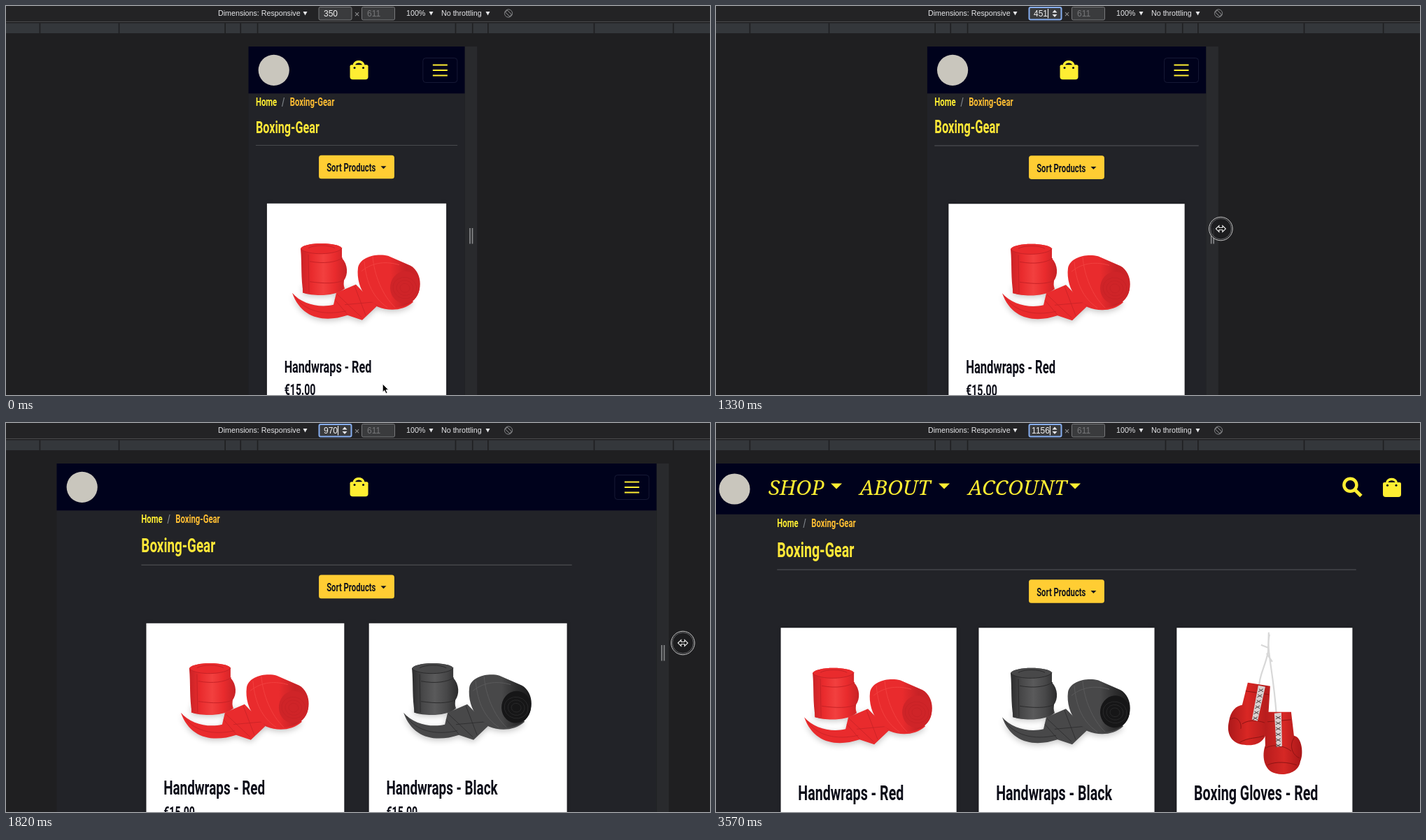
An HTML page with a canvas for the animation above (3780 ms loop, 1006 by 557 pixels).

```html
<!DOCTYPE html>
<html lang="en">
<head>
<meta charset="utf-8">
<title>Responsive shop preview</title>
<style>
html, body { margin: 0; width: 100%; height: 100%; overflow: hidden; background: #1f1f21; }
canvas { display: block; }
</style>
</head>
<body>
<canvas id="stage" width="1006" height="557"></canvas>
<script>
const ctx = document.getElementById('stage').getContext('2d');
const LOOP = 3780, STEP = 70, ZOOM = 0.884, MID = 501, TOP = 58;
const YELLOW = '#ffee32', DARK = '#1f1f21', PAGE = '#222328', NAVY = '#00021c';
const UI = '"Liberation Sans", Arial, sans-serif';

// time, device width, pointer distance from the device's right edge, pointer y
const KEYS = [
  [0, 350, -116, 547], [140, 350, 8, 329], [350, 439, 9, 322], [560, 310, 24, 320],
  [840, 270, 24, 320], [1120, 310, 30, 319], [1190, 356, 20.5, 319], [1470, 546, 21.5, 319],
  [1680, 771, 34, 317], [1820, 970, 37.5, 315], [1890, 1050, 44, 318], [2030, 1156, 50, 330]
];

const PRODUCTS = [
  ['Handwraps - Red', () => wraps('#e92b2d', '#c72226', '#f2403f', '#cf2428')],
  ['Handwraps - Black', () => wraps('#484849', '#2b2b2c', '#5a5a5b', '#161617')],
  ['Boxing Gloves - Red', gloves]
];

function pose(t) {
  const i = KEYS.findIndex(k => k[0] > t);
  if (i < 0) return KEYS[KEYS.length - 1];
  const a = KEYS[i - 1], b = KEYS[i], u = (t - a[0]) / (b[0] - a[0]);
  return a.map((v, j) => v + (b[j] - v) * u);
}

function rect(x, y, w, h, fill, r = 0, line, lw = 1) {
  ctx.beginPath();
  ctx.roundRect(x, y, w, h, r);
  if (fill) { ctx.fillStyle = fill; ctx.fill(); }
  if (line) { ctx.strokeStyle = line; ctx.lineWidth = lw; ctx.stroke(); }
}

function circle(x, y, r, fill, line, lw = 1) {
  ctx.beginPath();
  ctx.arc(x, y, r, 0, 7);
  if (fill) { ctx.fillStyle = fill; ctx.fill(); }
  if (line) { ctx.strokeStyle = line; ctx.lineWidth = lw; ctx.stroke(); }
}

function shape(d, fill, line, lw = 1) {
  const p = new Path2D(d);
  if (fill) { ctx.fillStyle = fill; ctx.fill(p); }
  if (line) { ctx.strokeStyle = line; ctx.lineWidth = lw; ctx.stroke(p); }
}

// Left-to-right gradient through evenly spaced colours
function across(x0, x1, ...colors) {
  const g = ctx.createLinearGradient(x0, 0, x1, 0);
  colors.forEach((c, i) => g.addColorStop(i / (colors.length - 1), c));
  return g;
}

function caret(x, y, w, color) {
  shape(`M${x - w / 2} ${y - w / 4}h${w}l${-w / 2} ${w / 2}z`, color);
}

function text(s, x, y, font, color, align = 'left') {
  ctx.font = font;
  ctx.fillStyle = color;
  ctx.textAlign = align;
  ctx.fillText(s, x, y);
}

// Narrow display face; y is the middle of the capitals
function narrow(s, x, y, size, color) {
  const em = size * 1.213;
  ctx.save();
  ctx.translate(x, y + em * 0.355);
  ctx.scale(0.66, 1);
  text(s, 0, 0, `600 ${em}px Roboto, sans-serif`, color);
  ctx.restore();
}

// Draws in stage pixels around a point of the page
function at(x, y, draw) {
  ctx.save();
  ctx.translate(x, y);
  ctx.scale(1 / ZOOM, 1 / ZOOM);
  draw();
  ctx.restore();
}

function wraps(base, deep, light, core) {
  ctx.save();
  ctx.translate(-501, -283);
  // soft shadows on the ground
  ctx.shadowColor = 'rgba(0,0,0,.22)';
  ctx.shadowBlur = 9;
  ctx.shadowOffsetY = 3;
  shape('M424 411C444 415 470 415 484 405L482 398H424Z', base);
  shape('M515 420C530 436 562 442 582 424L560 400Z', base);
  shape('M409 411C422 427 448 433 468 428L472 411L500 399L530 430L509 450L488 443C455 454 422 448 409 411Z', base);
  ctx.shadowColor = 'transparent';
  shape('M413 416C426 437 454 444 486 437M473 413L508 446M498 401L514 443M484 428L528 424M488 442L470 421', null, deep, 0.8);

  shape('M421 348C425 338 474 338 480 347L480 361C489 371 489 385 483 393L482 406C470 416 440 416 425 411C421 390 423 370 421 348Z',
    across(420, 487, deep, base, light, base, deep));
  shape('M421 348C425 338 474 338 480 347C474 357 430 358 421 348Z', base);
  shape('M421 348C430 358 474 357 480 347M432 347C440 342 462 342 470 347M432 356L433 411M434 366C455 370 472 367 481 361M434 395C455 398 472 398 483 393', null, deep, 1);

  shape('M503 375C506 359 530 354 546 358L578 372C596 382 597 414 577 426C560 437 530 434 515 417C506 407 501 390 503 375Z',
    across(503, 595, base, base, base, deep, core));
  shape('M512 366C515 398 525 418 545 432M524 359C526 385 538 415 556 432M508 380C525 366 545 366 562 371', null, light, 1);
  ctx.beginPath();
  ctx.ellipse(570, 403, 21, 23, 0.15, 0, 7);
  ctx.fillStyle = core;
  ctx.fill();
  for (let r = 17; r > 3; r -= 5) {
    ctx.beginPath();
    ctx.ellipse(570, 404, r, r * 0.9, 0.2, 0, 7);
    ctx.strokeStyle = deep;
    ctx.lineWidth = 0.9;
    ctx.stroke();
  }
  ctx.restore();
}

function gloves() {
  ctx.save();
  ctx.translate(-784, -293.5);
  shape('M790 300L789 328C785 350 776 360 776 380M791 303C786 325 796 350 801 418M789 322L779 318M787 330L795 342', null, '#d8d8d8', 2.2);
  const skin = across(733, 838, '#ad191b', '#d92724', '#b81d1d', '#d62825', '#a81618');
  shape('M760 372L792 377L789 425C790 455 775 464 755 461C737 460 729 445 733 428C735 412 744 405 752 404Z', skin);
  shape('M735 425C743 418 752 428 750 438M752 431C762 424 778 426 788 431M757 384L790 389M748 458C760 450 774 452 783 448', null, '#8d1413', 1);
  shape('M775 376L785 378L774 427L766 425Z', '#d9d0d0');
  shape('M784 414L822 414L826 448C838 450 840 475 835 485C833 500 815 506 800 502C782 498 780 475 785 462Z', skin);
  shape('M785 466C798 458 815 464 822 470M827 450C818 462 824 476 834 480M788 428L822 425M788 490C800 484 818 486 830 490', null, '#8d1413', 1);
  shape('M798 416L808 415L809 463L801 464Z', '#d9d0d0');
  for (let i = 0; i < 6; i++) {
    const y = i * 8;
    shape(`M${776 - i * 1.6} ${381 + y}l6 4m0 -4l-7 4M800 ${420 + y}l7 4m0 -4l-7 4`, null, '#4a3a39', 1);
  }
  ctx.restore();
}

function bag() {
  shape('M-7 -5V-8A7 6 0 0 1 6 -8V-5', null, YELLOW, 3.4);
  rect(-13, -7.3, 26, 21, YELLOW, [2, 2, 4, 4]);
  circle(-6.5, -3, 1.5, NAVY);
  circle(6, -3, 1.5, NAVY);
}

function nav(W, wide, h) {
  rect(0, 0, W, h, NAVY);
  circle(41.2, wide ? 41.3 : 38.3, 25, '#c9c6bd');
  if (!wide) {
    at(W / 2 + 4, 38, bag);
    at(W - 40, 38.5, () => {
      rect(-24.5, -17.5, 49, 35, null, 4, '#171a36');
      for (const y of [-7.5, 0, 7.5]) rect(-10.5, y - 1, 21, 2, YELLOW);
    });
    return;
  }
  const items = [['SHOP', 85, 182], ['ABOUT', 215, 336], ['ACCOUNT', 370, 523]];
  at(0, 0, () => {
    for (const [label, x, end] of items) {
      text(label, x, 45, 'italic 500 29.5px "Noto Serif", serif', YELLOW);
      caret(end, 32.5, 16, YELLOW);
    }
  });
  at(W - 116, 38, () => {
    circle(-3, -2.8, 9, null, YELLOW, 4.5);
    shape('M4 4.5L12.5 13', null, YELLOW, 5);
  });
  at(W - 52, 38.8, bag);
}

function page(W) {
  const wide = W >= 992, navH = wide ? 82.2 : 76, shift = navH - 76;
  const box = wide ? 960 : W >= 768 ? 720 : W >= 576 ? 540 : W;
  const cols = wide ? 3 : W >= 768 ? 2 : 1;
  const left = (W - box) / 2, head = 20.8 + 0.006 * W;
  const rule = 132.4 + shift + head * 1.2;

  ctx.save();
  ctx.translate(MID - W * ZOOM / 2, TOP);
  ctx.scale(ZOOM, ZOOM);
  ctx.beginPath();
  ctx.rect(0, 0, W, 600);
  ctx.clip();
  rect(0, 0, W, 600, PAGE);
  nav(W, wide, navH);

  const x = left + 12, crumb = 89.4 + shift;
  narrow('Home', x, crumb, 16, YELLOW);
  narrow('/', x + 42, crumb, 16, '#7d8287');
  narrow('Boxing-Gear', x + 55.3, crumb, 16, '#ffbe33');
  narrow('Boxing-Gear', x, 116.5 + shift + head * 0.6, head, '#ffe838');
  rect(x, rule - 0.5, box - 24, 1.1, '#55575a');

  rect(W / 2 - 61, rule + 16.2, 122, 38, '#ffcd33', 4);
  narrow('Sort Products', W / 2 - 48.5, rule + 36, 16, '#15161c');
  caret(W / 2 + 43.5, rule + 36.2, 9, '#15161c');

  const col = box / cols, gap = cols > 1 ? 2 + 0.05 * col : 14 + 0.046 * col;
  const y = rule + 94.3;
  for (let i = 0; i < cols; i++) {
    const [name, draw] = PRODUCTS[i], cx = left + i * col;
    ctx.shadowColor = 'rgba(0,0,0,.2)';
    ctx.shadowBlur = 6;
    rect(cx + gap, y, col - 2 * gap, 500, '#fff');
    ctx.shadowBlur = 0;
    at(cx + col / 2, y, draw);
    narrow(name, cx + gap + 28, y + 250 + head * 0.6, head, '#0c0d18');
    narrow('€15.00', cx + gap + 28, y + 274 + head * 1.2, 20, '#0c0d18');
  }
  ctx.restore();
}

function toolbar(W, focused, blink) {
  rect(0, 0, 1006, TOP, DARK);
  rect(0, 0, 1006, 22, '#232325');
  rect(0, 22, 1006, 1, '#4a4b4d');
  rect(0, 24.5, 1006, 14.5, '#34373b');
  for (const w of [320, 375, 425, 768, 1024])
    for (const side of [-1, 1]) rect(MID - 0.8 + side * w * ZOOM / 2, 24.5, 1.6, 14.5, DARK);

  const font = `10.7px ${UI}`, soft = '#e6e7ea';
  text('Dimensions: Responsive', 303, 14, font, soft);
  text('100%', 572, 14, font, soft);
  text('No throttling', 622, 14, font, soft);
  for (const x of [427.5, 607.5, 688.5]) shape(`M${x - 3} 8h6l-3 5.5z`, soft);

  if (focused) rect(447.5, 2, 46, 17.5, '#3a3b3d', 2, '#86aef0', 2);
  else rect(447, 1.5, 47, 18.5, '#3a3b3d', 2, '#77787a');
  const value = String(Math.round(W));
  text(value, 464, 15, `12px ${UI}`, '#f2f2f2', 'center');
  if (focused) {
    if (blink) rect(464 + ctx.measureText(value).width / 2, 4, 1, 13.5, '#fff');
    shape('M480.5 9.5h7l-3.5 -4zM480.5 12h7l-3.5 4z', soft);
  }
  text('×', 501.5, 16, `13px ${UI}`, '#9a9b9d', 'center');
  rect(508.5, 1.5, 47, 18.5, '#3a3b3d', 2, '#77787a');
  text('611', 516, 15, `12px ${UI}`, '#77787a');

  circle(718, 10.5, 5.6, null, '#8d8e90', 0.9);
  ctx.save();
  ctx.translate(718, 10.5);
  ctx.rotate(-Math.PI / 4);
  rect(-2, -4.5, 4, 9, null, 1, '#a5a6a8', 0.9);
  ctx.restore();
}

function pointer(x, y, drag) {
  ctx.save();
  ctx.translate(x, y);
  if (drag) {
    circle(0, 0, 16.8, 'rgba(28,28,30,.85)', '#c9c9c9', 1);
    circle(0, 0, 15, null, '#77787a', 0.8);
    shape('M-7 0L-2.5 -4.5V-1.5H2.5V-4.5L7 0L2.5 4.5V1.5H-2.5V4.5Z', '#111', '#eee', 1.1);
  } else {
    shape('M-1.5 -6V6L1.2 3.5L3.3 8L5.4 7L3.3 2.8H7Z', '#000', '#fff', 0.9);
  }
  ctx.restore();
}

function inspector() {
  rect(0, 58, 1006, 1, 'rgba(130,180,215,.5)');
  shape('M1 67L8 60.5L15 67Z', '#fff');
  rect(-6, 66, 100, 25, '#fff', 2.5);
  text('iframe', -0.5, 83, `bold 11px ${UI}`, '#7d1a80');
  text('1156\u2009×\u20091', 44, 83, `10.8px ${UI}`, '#75777a');
}

function draw(now) {
  const t = Math.floor(now % LOOP / STEP) * STEP;
  const [, W, off, py] = pose(t), right = MID + W * ZOOM / 2;
  const grabbed = t >= 140;

  rect(0, 0, 1006, 557, DARK);
  rect(right, TOP, 17.5, 500, grabbed && t < 1330 ? '#393b3e' : '#292a2d');
  for (const x of [6.5, 10]) rect(right + x, 318, 1.6, 22.5, '#8b8c8e');
  page(W);
  toolbar(W, t >= 210, t < 3010 || t >= 3570);
  if (t < 2030) pointer(right + off, py, grabbed);
  if (t >= 2730 && t < 3010) {
    inspector();
    circle(1007 + (t - 2730) / 20, 336, 10, '#1b1b1d', '#a0a1a3', 1.3);
  }
}

const start = performance.now();
function tick() {
  draw(performance.now() - start);
  requestAnimationFrame(tick);
}
tick();
</script>
</body>
</html>
```
